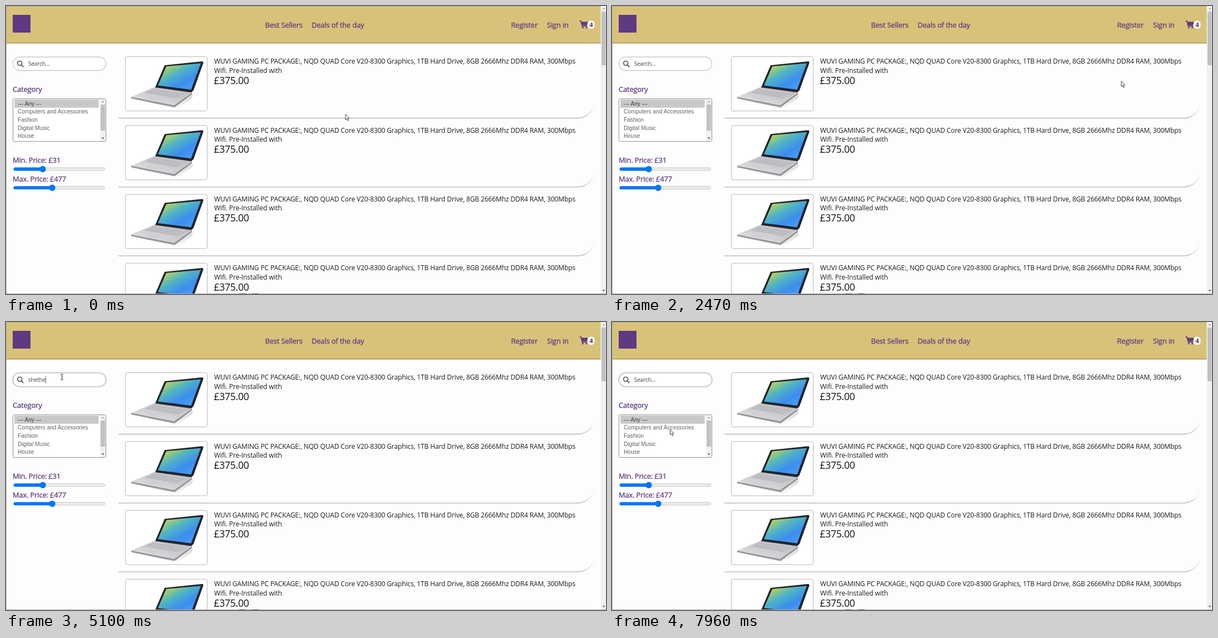
These frames come from a looping animation (1078x520 px, 8 s). An HTML page:

```html
<!DOCTYPE html>
<html lang="en">
<head>
<meta charset="utf-8">
<title>Shop search</title>
<style>
  html, body { margin: 0; width: 100%; height: 100%; overflow: hidden; background: #fdfdfb; }
  svg { display: block; width: 1078px; height: 520px; font-family: "Open Sans", "Noto Sans", sans-serif; }
  text { white-space: pre; }
  .nav { font-size: 13px; letter-spacing: -.2px; fill: #5e3a80; stroke: #5e3a80; stroke-width: .3px; }
  .name { font-size: 12px; letter-spacing: -.12px; fill: #1c1c1c; }
  .price { font-size: 17.6px; letter-spacing: -.28px; fill: #111; }
  .list { font: 10.16px "Liberation Sans", Arial, sans-serif; fill: #626262; }
  .field { font-size: 10.2px; letter-spacing: -.16px; fill: #666; stroke: #666; stroke-width: .2px; }
  .badge { font: bold 13px "Liberation Serif", serif; fill: #3d2a52; }
</style>
</head>
<body>
<svg viewBox="0 0 1078 520">
  <defs>
    <linearGradient id="display" x1="0" y1="0" x2=".9" y2="1">
      <stop offset="0" stop-color="#3f9f8e"/>
      <stop offset=".2" stop-color="#a9cf6c"/>
      <stop offset=".42" stop-color="#4fb4c4"/>
      <stop offset=".7" stop-color="#3d8df0"/>
      <stop offset="1" stop-color="#4aa5fa"/>
    </linearGradient>
    <linearGradient id="deck" x1="0" y1="1" x2="1" y2="0">
      <stop offset="0" stop-color="#e6e6e8"/>
      <stop offset="1" stop-color="#b4b5b9"/>
    </linearGradient>
    <linearGradient id="shade" x1="0" y1="0" x2="0" y2="1">
      <stop offset="0" stop-color="#d4d4d4"/>
      <stop offset="1" stop-color="#fdfdfd"/>
    </linearGradient>
  </defs>
  <rect width="1078" height="520" fill="#fdfdfb"/>

  <g id="item">
    <path d="M202 201.6H1027A30 28 0 0 0 1057 173.5A30 30 0 0 1 1027 203.4H202Z" fill="#c6c6c6"/>
    <rect x="214.5" y="91.5" width="147" height="98" rx="3" fill="#fff" stroke="#b8b8b8"/>
    <path d="M228 167L303 183 336 160 334 167 306 187Z" fill="url(#shade)"/>
    <path d="M225 164L302 179 334 156V160L303 183 225 167Z" fill="#96979b"/>
    <path d="M268 146L334 155 302 179 225 164Z" fill="url(#deck)"/>
    <path d="M266 149L324 157 308 167 248 157Z" fill="#c3c4c8"/>
    <path d="M262 151L319 160M257 153.500L314 163M252 155.500L309 165.500" stroke="#a3a4a8" stroke-width=".9" stroke-dasharray="3 1"/>
    <path d="M259 163L280 167 271 171 250 167Z" fill="#cfd0d3"/>
    <path d="M285 107L352 100Q355 100 354.500 103L337 152 333 156 268 147Z" fill="#22242a"/>
    <path d="M288 109L350 103.500 332.500 151 273 143.500Z" fill="url(#display)"/>
    <text class="name" x="374" y="104.300">WUVI GAMING PC PACKAGE:, NQD QUAD Core V20-8300 Graphics, 1TB Hard Drive, 8GB 2666Mhz DDR4 RAM, 300Mbps</text>
    <text class="name" x="374" y="120.800">Wifi. Pre-Installed with</text>
    <text class="price" x="373.500" y="140.800">£375.00</text>
  </g>

  <rect width="1069" height="67" fill="#d8c27a"/>
  <rect y="66" width="1069" height="1.600" fill="#ae9852"/>
  <rect x="12" y="16" width="32" height="32" fill="#5e3a80"/>
  <g class="nav">
    <text x="465.500" y="38.600">Best Sellers</text>
    <text x="549" y="38.600">Deals of the day</text>
    <text x="907.500" y="38.600">Register</text>
    <text x="972" y="38.600">Sign in</text>
    <text x="12" y="155">Category</text>
    <text x="12" y="283">Min. Price: £31</text>
    <text x="12" y="316.500">Max. Price: £477</text>
  </g>
  <g fill="#5e3a80">
    <path d="M1033.500 28.500H1045.500L1043.800 34.800H1035Z"/>
    <path d="M1030.500 27.200H1033L1035.200 36.200H1043.800" fill="none" stroke="#5e3a80" stroke-width="1.700"/>
    <circle cx="1036.300" cy="38.800" r="1.600"/>
    <circle cx="1042.600" cy="38.800" r="1.600"/>
  </g>
  <rect x="1045" y="26.500" width="12.500" height="14.500" rx="5.500" fill="#fff"/>
  <text class="badge" x="1048" y="38.300">4</text>

  <rect x="12.500" y="92" width="167" height="24.500" rx="12.250" fill="#fff" stroke="#b2b2b2"/>
  <rect id="ring" x="12.200" y="91.700" width="167.600" height="25.200" rx="12.600" fill="none" stroke="#d2d2d2" stroke-width="2.400"/>
  <g fill="none" stroke="#666">
    <circle cx="24.700" cy="103.300" r="3.900" stroke-width="1.900"/>
    <path d="M27.600 106.200L31.300 110" stroke-width="2.300"/>
  </g>
  <text id="query" class="field" x="39.800" y="108.200"></text>
  <rect id="caret" y="97" width="1" height="14" fill="#777"/>

  <rect x="12.500" y="167.500" width="167" height="77" rx="2" fill="#fff" stroke="#919191"/>
  <rect x="15" y="169" width="151.500" height="14.700" fill="#c8c8c8"/>
  <g class="list">
    <text x="21" y="179.600" fill="#3c3c3c">--- Any ---</text>
    <text x="21" y="194.200">Computers and Accessories</text>
    <text x="21" y="208.900">Fashion</text>
    <text x="21" y="223.600">Digital Music</text>
    <text x="21" y="238.300">House</text>
  </g>
  <rect x="169" y="168" width="10" height="76" fill="#f1f1f1"/>
  <rect x="170" y="178" width="8" height="47" fill="#c1c1c1"/>
  <path d="M171.500 174L174 171.300 176.500 174Z" fill="#a3a3a3"/>
  <path d="M171.500 237.500L174 240.200 176.500 237.500Z" fill="#505050"/>

  <g id="sliders"></g>

  <rect x="1068.500" width="9.500" height="520" fill="#f1f1f1"/>
  <rect x="1070" y="10" width="7.500" height="97" fill="#c1c1c1"/>
  <path d="M1071.500 6L1074 3.300 1076.500 6Z" fill="#a3a3a3"/>
  <path d="M1071.500 512.500L1074 515.200 1076.500 512.500Z" fill="#505050"/>
  <path d="M0 .5H1068" stroke="#b5a672"/>
  <path d="M.5 0V520M0 519.500H1078" stroke="#b0b0b0"/>
  <path d="M419 519.500H431M442 519.500H454" stroke="#555"/>

  <g id="cursor">
    <path id="arrow" d="M.5 .5V10.300L2.700 8.300 4.300 11.900 5.900 11.200 4.300 7.700H7.200Z" fill="#fff" stroke="#333" stroke-width=".9"/>
    <path id="beam" d="M-2 -5H-.6L0 -4.500 .6 -5H2M0 -4.500V4.500M-2 5H-.6L0 4.500 .6 5H2" fill="none" stroke="#222"/>
  </g>
</svg>
<script>
const LOOP = 8000, PITCH = 124.3;
const $ = id => document.getElementById(id);
const query = $('query'), caret = $('caret'), ring = $('ring');

for (let i = 3; i > 0; i--) {
  const copy = $('item').cloneNode(true);
  copy.removeAttribute('id');
  copy.setAttribute('transform', `translate(0 ${i * PITCH})`);
  $('item').after(copy);
}

const slider = (x, y) => `
  <rect x="14" y="${y - 2.5}" width="163.500" height="5" rx="2.500" fill="#ececec" stroke="#bdbdbd" stroke-width=".8"/>
  <rect x="13.600" y="${y - 2.9}" width="${x - 13.6}" height="5.800" rx="2.900" fill="#0075ff"/>
  <circle cx="${x}" cy="${y}" r="5.700" fill="#0075ff"/>`;
$('sliders').innerHTML = slider(66, 294.5) + slider(83, 328.2);

// Pointer hot spot: time, x, y
const path = [
  [0, 609.5, 195], [440, 609.5, 195], [530, 605, 201], [760, 400, 148],
  [1050, 156, 61], [1240, 95, 36], [1270, 90, 35], [1640, 425, 1],
  [1830, 657, 17], [2050, 960, 34], [2180, 1003, 62], [2470, 915, 135],
  [2660, 600, 180], [2860, 267, 207], [2920, 262, 205], [3210, 99.5, 99.5],
  [4340, 99.5, 99.5], [4350, 100, 99.5], [4570, 100.5, 99.5], [6920, 100.5, 99.5],
  [7300, 102, 140], [7740, 104, 193.5], [LOOP, 104, 193.5]
];
const slope = (i, k) => (path[i + 1][k] - path[i][k]) / (path[i + 1][0] - path[i][0]);

function tangent(i, k) {
  if (i === 0 || i === path.length - 1) return 0;
  const a = slope(i - 1, k), b = slope(i, k);
  return a * b > 0 ? 2 * a * b / (a + b) : 0;
}

// Monotone cubic through the path points
function along(t, k) {
  let i = 0;
  while (i < path.length - 2 && path[i + 1][0] <= t) i++;
  const span = path[i + 1][0] - path[i][0], u = (t - path[i][0]) / span;
  const v = 1 - u;
  return path[i][k] * (1 + 2 * u) * v * v + path[i + 1][k] * u * u * (3 - 2 * u)
    + span * (tangent(i, k) * u * v * v - tangent(i + 1, k) * u * u * v);
}

// Time, letters in the field
const WORD = 'shetheth';
const keys = [
  [0, 0], [4520, 1], [4720, 2], [4900, 3], [4950, 4], [5010, 5], [5060, 6], [5110, 7], [5160, 8],
  [5930, 7], [6450, 6], [6500, 5], [6550, 4], [6610, 3], [6660, 1], [6710, 0]
];
const blinks = [[3840, 4190], [4520, 5680], [6260, 7210]];

const show = (el, on) => el.setAttribute('visibility', on ? 'visible' : 'hidden');

function draw(t) {
  const x = along(t, 1), y = along(t, 2);
  const inField = x > 12 && x < 180 && y > 91 && y < 117;
  $('cursor').setAttribute('transform', `translate(${x.toFixed(1)} ${y.toFixed(1)})`);
  show($('beam'), inField);
  show($('arrow'), !inField);

  const typed = WORD.slice(0, keys.filter(k => k[0] <= t).pop()[1]);
  query.textContent = typed || 'Search...';
  caret.setAttribute('x', typed ? Math.round(39.5 + query.getComputedTextLength()) : 40);
  show(caret, blinks.some(([from, to]) => t >= from && t < to));
  ring.setAttribute('opacity', Math.min(1, Math.max(0, (t - 3800) / 170)));
}

function tick() {
  draw(performance.now() % LOOP);
  requestAnimationFrame(tick);
}
tick();
</script>
</body>
</html>
```
